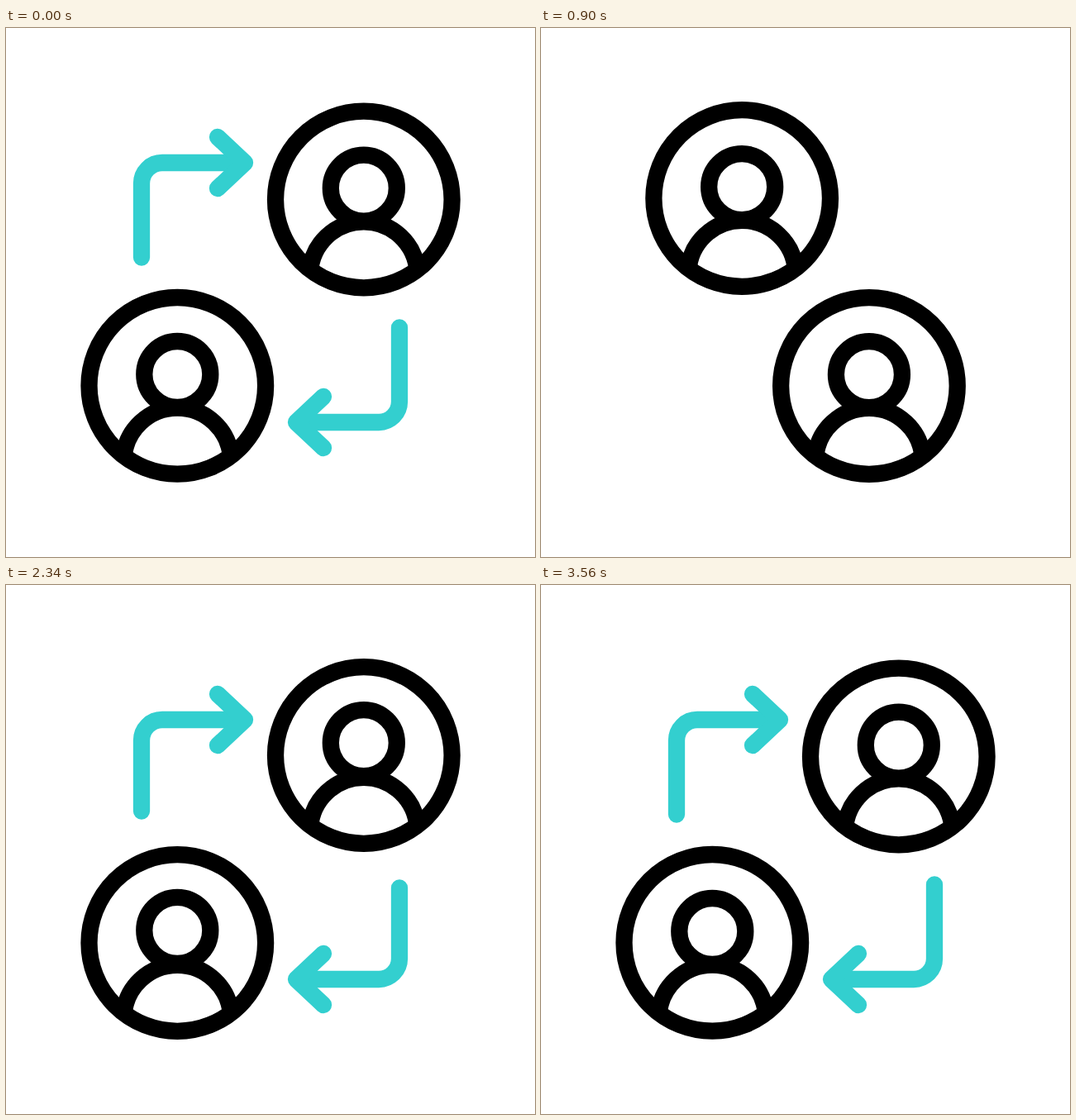
Write an HTML page that moves like this. It is 640 px wide and 640 px high and loops after 3600 ms.

```html
<!DOCTYPE html>
<html lang="en">
<head>
<meta charset="utf-8">
<title>Swapping users</title>
<style>
  html, body { margin: 0; width: 100%; height: 100%; overflow: hidden; background: #fff; }
  svg { display: block; width: 100vw; height: 100vh; }
  g { fill: none; stroke-width: 20.3; }
  .arrow { stroke: #33cfcf; stroke-linecap: round; stroke-linejoin: round; }
  .user { stroke: #000; }
</style>
</head>
<body>
<svg viewBox="0 0 640 640">
  <defs>
    <g id="arrow">
      <path id="shaft" pathLength="100" d="M164 277.5V188A25 25 0 0 1 189 163H288"/>
      <path id="tip" pathLength="100" d="M256 132L289 163L256 194"/>
    </g>
  </defs>
  <g class="arrow">
    <use href="#arrow"/>
    <use href="#arrow" transform="rotate(180 320 320)"/>
  </g>
  <g class="user">
    <circle r="106.8"/>
    <circle class="head" r="40"/>
    <path d="M-64.9 88.2A65 65 0 0 1 64.9 88.2"/>
  </g>
  <g class="user">
    <circle r="106.8"/>
    <circle class="head" r="40"/>
    <path d="M-64.9 88.2A65 65 0 0 1 64.9 88.2"/>
  </g>
</svg>
<script>
const LOOP = 3600, LEG = 400;
const LEG_STARTS = [400, 800, 2400, 2800];
const LEFT = 207.3, RIGHT = 432.8;
const users = [...document.querySelectorAll('.user')];
const shaft = document.getElementById('shaft');
const tip = document.getElementById('tip');

// Clockwise corners visited by each user, and the height of its nod
const routes = [
  { nod: 14, stops: [[RIGHT, 207.5], [RIGHT, 433], [LEFT, 433], [LEFT, 206], [RIGHT, 207.5]] },
  { nod: 11.5, stops: [[LEFT, 432.8], [LEFT, 206], [RIGHT, 206], [RIGHT, 433], [LEFT, 432.8]] }
];

const clamp = v => Math.min(1, Math.max(0, v));
const ease = (t, start, length) => {
  const u = clamp((t - start) / length);
  return u * u * (3 - 2 * u);
};

// Show the part of a path between two percentages
function trim(path, from, to) {
  const length = to - from;
  path.style.display = length > 0.3 ? '' : 'none';
  path.setAttribute('stroke-dasharray', `${length} 300`);
  path.setAttribute('stroke-dashoffset', -from);
}

function drawArrows(t) {
  let drawn = 1, erased;
  if (t < 1000) {
    erased = ease(t, 0, 400);
  } else if (t < 3000) {
    drawn = ease(t, 1910, 400);
    erased = ease(t, 2310, 400);
  } else {
    drawn = ease(t, 3200, 400);
    erased = 0;
  }
  trim(shaft, erased * 100, drawn * 100);
  const open = clamp((drawn - 0.7) / 0.25) * clamp((1 - erased) / 0.3);
  trim(tip, 50 - 50 * open, 50 + 50 * open);
}

function drawUsers(t) {
  const progress = LEG_STARTS.map(start => ease(t, start, LEG));
  // Two nods while the users rest in swapped places
  const phase = t > 1200 && t < 2400 ? (t - 1200) % 600 : 0;
  const lift = ease(phase, 0, 300) - ease(phase, 300, 300);
  users.forEach((user, i) => {
    const { nod, stops } = routes[i];
    const [x, y] = [0, 1].map(axis => progress.reduce(
      (sum, p, leg) => sum + p * (stops[leg + 1][axis] - stops[leg][axis]), stops[0][axis]));
    user.setAttribute('transform', `translate(${x} ${y})`);
    user.querySelector('.head').setAttribute('cy', -13.8 - nod * lift);
  });
}

const began = performance.now();
function frame() {
  const t = (performance.now() - began) % LOOP;
  drawArrows(t);
  drawUsers(t);
  requestAnimationFrame(frame);
}
frame();
</script>
</body>
</html>
```
